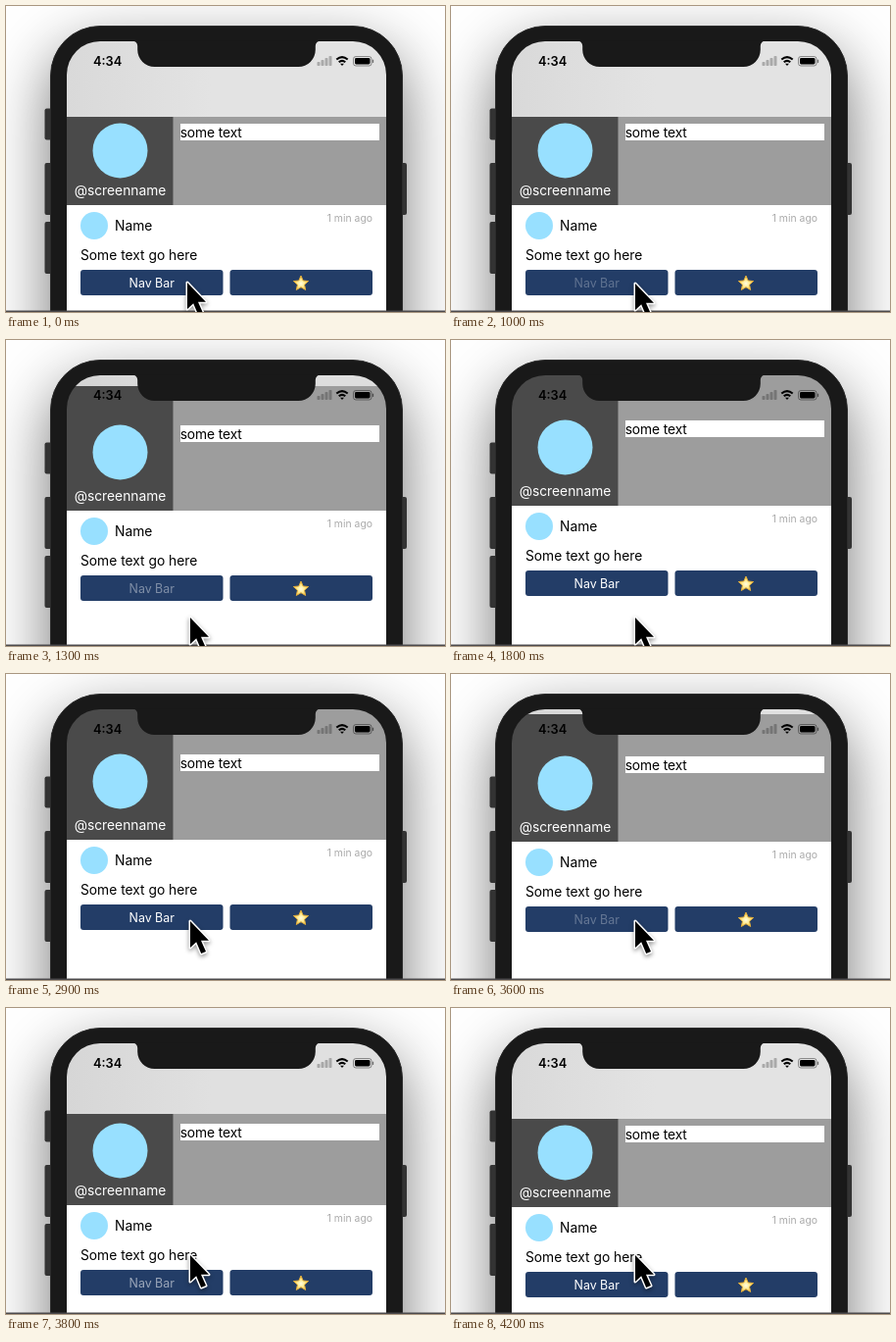
Recreate the animation shown at these times as an HTML page. Size 448 by 312 pixels, loop 4300 ms.

```html
<!DOCTYPE html>
<html lang="en">
<head>
<meta charset="utf-8">
<style>
html, body { margin: 0; width: 100%; height: 100%; overflow: hidden; background: #fff; }
#stage { position: relative; width: 100%; height: 100%; overflow: hidden; }
#phone {
  position: absolute; left: 45px; top: 20px; width: 360px; height: 600px; border-radius: 51px;
  box-shadow: 0 24px 64px rgba(0, 0, 0, .55);
}
svg { position: absolute; left: 0; top: 0; overflow: hidden; font: 13.8px Inter, sans-serif; }
#cursor { filter: drop-shadow(0 2px 2px rgba(0, 0, 0, .4)); }
</style>
</head>
<body>
<div id="stage">
<div id="phone"></div>
<svg width="448" height="312" viewBox="0 0 448 312">
  <defs>
    <clipPath id="screen"><rect x="62" y="36" width="326" height="400" rx="34"/></clipPath>
    <linearGradient id="bar">
      <stop offset="0" stop-color="#d9d9d9"/><stop offset=".45" stop-color="#e3e3e3"/>
    </linearGradient>
    <radialGradient id="gold" cy=".55">
      <stop offset="0" stop-color="#fffce4"/><stop offset=".4" stop-color="#ffefa0"/>
      <stop offset="1" stop-color="#f6cd4c"/>
    </radialGradient>
  </defs>

  <g fill="#333">
    <rect x="39.5" y="104.5" width="9" height="32" rx="2"/>
    <rect x="39.5" y="160" width="9" height="53" rx="2"/>
    <rect x="39.5" y="220" width="9" height="53" rx="2"/>
    <rect x="400" y="160" width="9" height="53" rx="2"/>
  </g>
  <rect x="45.5" y="20.5" width="359" height="340" rx="50.5" fill="#191919" stroke="#2c2c2c"/>

  <g clip-path="url(#screen)">
    <rect x="62" y="160" width="326" height="152" fill="#fff"/>
    <rect id="nav" x="62" y="36" width="326" fill="url(#bar)"/>
    <rect id="shade" x="62" y="36" width="326"/>
    <rect id="left" x="62" width="109" fill="#4a4a4a"/>
    <rect id="right" x="170.5" width="218" fill="#9d9d9d"/>
    <g id="head">
      <circle cx="116.5" cy="147.5" r="28" fill="#98e0ff"/>
      <rect x="178" y="120" width="203" height="17" fill="#fff"/>
      <text x="177.7" y="133.5" letter-spacing="-.1">some text</text>
    </g>
    <g id="body">
      <text x="116.5" y="193" text-anchor="middle" fill="#fff">@screenname</text>
      <circle cx="90" cy="224" r="14" fill="#98e0ff"/>
      <text x="111" y="229">Name</text>
      <text x="374" y="219.5" text-anchor="end" font-size="10.4" fill="#aaa">1 min ago</text>
      <text x="76" y="258.7">Some text go here</text>
      <g fill="#233d67">
        <rect x="76" y="269" width="145.5" height="26" rx="3"/>
        <rect x="228.5" y="269" width="145.5" height="26" rx="3"/>
      </g>
      <text id="label" x="148.7" y="286.8" text-anchor="middle" font-size="12.4" fill="#fff">Nav Bar</text>
      <path id="star" fill="url(#gold)" stroke="#e3ae3c" stroke-linejoin="round"/>
    </g>
  </g>

  <path d="M129 35.5a5.2 5.2 0 0 1 5.2 5.2v3.9a17.4 17.4 0 0 0 17.4 17.4h146.8a17.4 17.4 0 0 0 17.4-17.4v-3.9a5.2 5.2 0 0 1 5.2-5.2z" fill="#191919"/>
  <text x="89" y="60.6" font-size="12.8" font-weight="600">4:34</text>
  <g fill="#000" fill-opacity=".25">
    <rect x="317.5" y="57" width="3" height="4" rx=".7"/>
    <rect x="321.5" y="55" width="3" height="6" rx=".7"/>
    <rect x="325.5" y="53" width="3" height="8" rx=".7"/>
    <rect x="329.5" y="51" width="3" height="10" rx=".7"/>
  </g>
  <g fill="none" stroke="#000" stroke-width="2">
    <path d="M337.3 54.6q5.7-5 11.4 0M339.7 57.3q3.3-2.8 6.6 0"/>
    <path d="M341 58.8h4l-2 2.2z" fill="#000" stroke="none"/>
    <rect x="354.5" y="51.5" width="18.5" height="9.5" rx="2.5" stroke-width="1" stroke-opacity=".4"/>
    <rect x="356" y="53" width="15.5" height="6.5" rx="1.4" fill="#000" stroke="none"/>
    <path d="M374.5 54.7v3.2" stroke-width="1.3" stroke-opacity=".5"/>
  </g>

  <rect y="310.5" width="448" height="1.5" fill="#4c4a4c"/>
  <path id="cursor" d="M0 0V27L6.2 21.2L11.2 33L16 31L11 19.8H19Z" stroke="#fff" stroke-width="3" stroke-linejoin="round" paint-order="stroke"/>
</svg>
</div>
<script>
const LOOP = 4300, STEP = 100, MOVE = 284;
const $ = id => document.getElementById(id);
const clamp = x => Math.max(0, Math.min(1, x));
const ease = x => (x = clamp(x), x * x * (3 - 2 * x));
const set = (id, attrs) => { for (const k in attrs) $(id).setAttribute(k, attrs[k]); };
const shift = (id, x, y) => set(id, { transform: `translate(${x} ${y})` });

const star = Array.from({ length: 10 }, (_, i) => {
  const r = i % 2 ? 3.7 : 8, a = i * Math.PI / 5;
  return [(301 + r * Math.sin(a)).toFixed(2), (283 - r * Math.cos(a)).toFixed(2)];
});
set('star', { d: 'M' + star.join('L') + 'Z' });

// Label dims on press and fades back after release
const labelAlpha = (t, press, release) => t < press ? 1 : .27 + .73 * clamp((t - release) / 600);

function cursorAt(t) {
  if (t < 2300) return [185 + 3 * clamp(t / 300), 282 + clamp(t / 300)];
  return t < 2400 ? [198, 266] : [188, 252];
}

function draw(t) {
  const p = ease((t - 1085) / MOVE) - ease((t - 3558) / MOVE);  // 1 = bar hidden
  const barHeight = Math.round(77 * (1 - p)), top = 36 + barHeight;
  const rise = Math.round(-34 * p);
  const box = { y: top, height: 203 + rise - top };
  set('left', box);
  set('right', box);
  set('nav', { height: barHeight });
  set('shade', { height: barHeight, opacity: .2 * p * (1 - p) });
  shift('head', 0, Math.round(-38.5 * p));
  shift('body', 0, rise);
  set('label', { opacity: t < 3400 ? labelAlpha(t, 1000, 1180) : labelAlpha(t, 3400, 3580) });
  shift('cursor', ...cursorAt(t));
}

const start = performance.now();
function tick() {
  const t = (performance.now() - start) % LOOP;
  draw(Math.floor(t / STEP) * STEP);
  requestAnimationFrame(tick);
}
tick();
</script>
</body>
</html>
```
